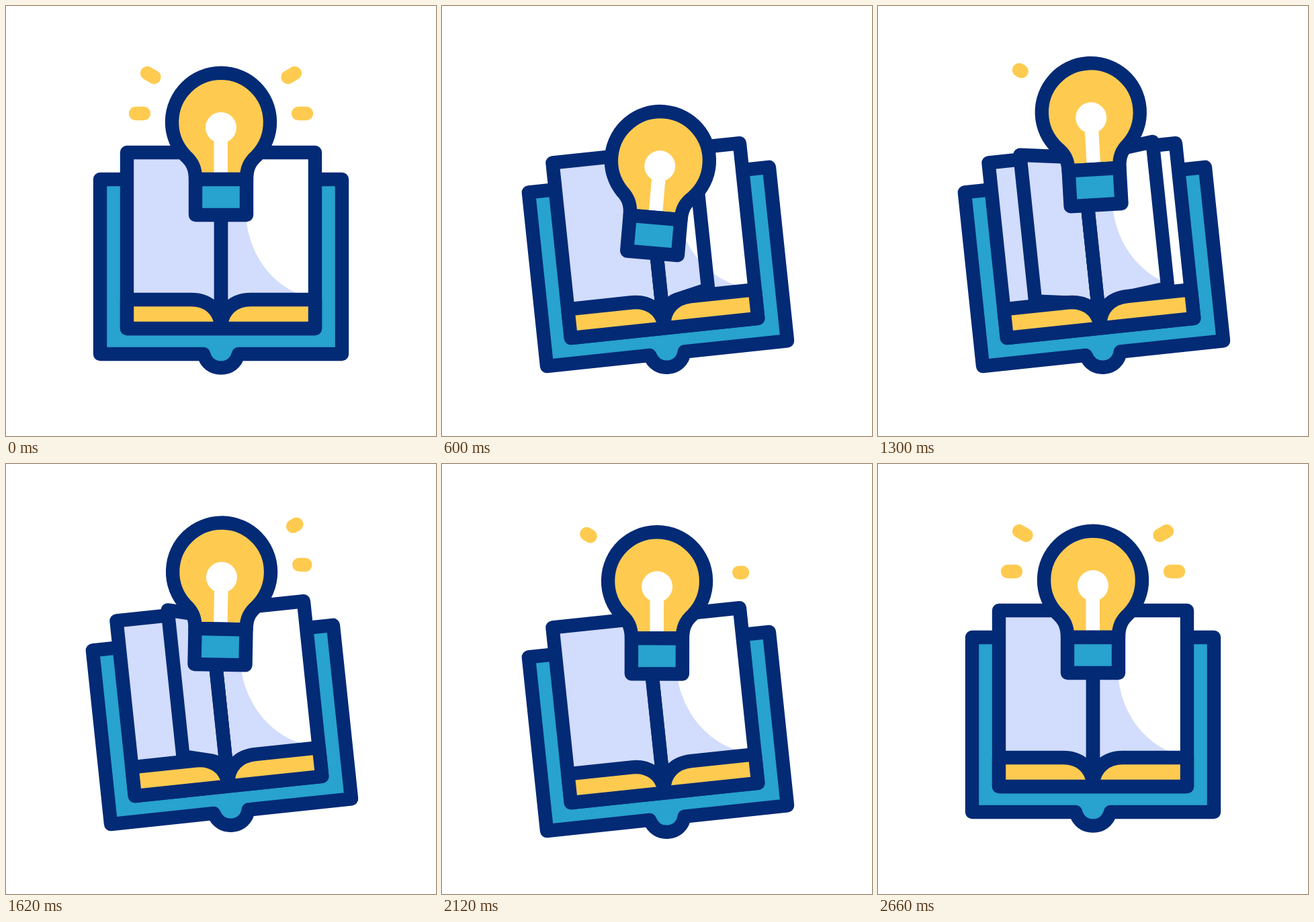
An HTML page with a canvas for the animation above (3.02 s loop, 640 by 640 pixels).

```html
<!DOCTYPE html>
<html lang="en">
<head>
<meta charset="utf-8">
<title>Book and bulb</title>
<style>
html, body { margin: 0; width: 100%; height: 100%; overflow: hidden; background: #fff; }
canvas { display: block; width: 640px; height: 640px; }
</style>
</head>
<body>
<canvas id="stage" width="640" height="640"></canvas>
<script>
const ctx = document.getElementById('stage').getContext('2d');
const LOOP = 3020;
const NAVY = '#032a75', TEAL = '#28a2ce', YELLOW = '#fecb50', LILAC = '#d2dcfd', WHITE = '#fff';

const cover = new Path2D('M140 258H500V518H346C342 532 332 538.5 320 538.5S298 532 294 518H140Z');
const block = new Path2D('M180 218H460V480H180Z');
const pageEdges = new Path2D('M180 437H276C300 437 318 452 320 475C322 452 340 437 364 437H460V480H180Z');
const spine = new Path2D('M320 218V476');
const shade = new Path2D('M160 190H380C365 245 357 270 357 305C357 355 385 407 434 428V480H160Z');
const glass = new Path2D('M282 258C282 241 277 232 267 223A73 73 0 1 1 373 223C363 232 358 241 358 258Z');
const socket = new Path2D('M282 258H358V311H282Z');

const clamp = v => Math.max(0, Math.min(1, v));
const ease = (t, from, to) => (1 - Math.cos(Math.PI * clamp((t - from) / (to - from)))) / 2;

// Each movement is a sum of eased steps
const bookY = t => 47 * (ease(t, 0, 240) - ease(t, 240, 484)) - 28.5 * ease(t, 1640, 1840)
  + 74.5 * ease(t, 1840, 2390) - 46 * ease(t, 2390, 2660);
const bookTurn = t => 6 * (ease(t, 2220, 2660) - ease(t, 0, 300));
const bulbY = t => 72 * ease(t, 0, 860) - 102 * ease(t, 860, 1450)
  + 56 * ease(t, 1450, 1900) - 26 * ease(t, 1900, 2160);
const bulbTurn = t => 15 * ease(t, 0, 380) - 23 * ease(t, 380, 860)
  + 9.5 * ease(t, 860, 1740) - 1.5 * ease(t, 1900, 2160);

function outlined(path, fill) {
  ctx.fillStyle = fill;
  ctx.fill(path);
  ctx.stroke(path);
}

function posed(pivotY, dy, degrees, draw) {
  ctx.save();
  ctx.translate(320, pivotY + dy);
  ctx.rotate(degrees * Math.PI / 180);
  ctx.translate(-320, -pivotY);
  draw();
  ctx.restore();
}

function shadedPage(path) {
  ctx.save();
  ctx.clip(path);
  ctx.fillStyle = WHITE;
  ctx.fill(path);
  ctx.fillStyle = LILAC;
  ctx.fill(shade);
  ctx.restore();
  ctx.stroke(path);
}

// A page swings about the spine; its outer edge tilts up, its inner edge down
function turningPage(progress) {
  const angle = progress * Math.PI, tilt = 9 * Math.sin(angle);
  const point = (x, y) => `${320 + 140 * x * Math.cos(angle)} ${y + tilt * (1 - 2 * x)} `;
  shadedPage(new Path2D('M' + point(0, 218) + 'L' + point(1, 218) + 'L' + point(1, 437) +
    'L' + point(0.31, 437) + 'C' + point(0.14, 437) + point(0.02, 452) + '320 475Z'));
}

function drawBook(t) {
  outlined(cover, TEAL);
  shadedPage(block);
  ctx.stroke(spine);
  for (let i = 0; i < 3; i++) {
    const u = (t - 366 - i * 388) / 825;
    if (u > 0 && u < 1) turningPage(1 - (1 - u) ** 1.2);
  }
  outlined(pageEdges, YELLOW);
  ctx.stroke(spine);
}

// Visible part of a ray: it grows outward, then leaves outward; the third growth stays
function raySpan(i, t) {
  if (t < 1200) return [clamp(t / 120), 1];
  const age = t - 1260 - 90 * i;
  const wave = Math.min(2, Math.floor(age / 400));
  const local = age - wave * 400;
  return age < 0 ? [0, 0] : [wave < 2 ? clamp(local / 120 - 1) : 0, clamp(local / 120)];
}

function drawRays(t) {
  ctx.strokeStyle = YELLOW;
  for (let i = 0; i < 4; i++) {
    const [from, to] = raySpan(i, t);
    if (to <= from) continue;
    const side = i < 2 ? -1 : 1, low = i % 2;
    const [x, y, angle] = low ? [115, 160, 0] : [99.5, 106, Math.PI / 6];
    ctx.beginPath();
    for (const u of [from, to]) {
      ctx.lineTo(320 + side * (x + 12 * u * Math.cos(angle)), y - 12 * u * Math.sin(angle));
    }
    ctx.stroke();
  }
  ctx.strokeStyle = NAVY;
}

function drawBulb(t) {
  drawRays(t);
  ctx.fillStyle = YELLOW;
  ctx.fill(glass);
  ctx.fillStyle = WHITE;
  ctx.beginPath();
  ctx.arc(320, 181, 23, 0, 2 * Math.PI);
  ctx.fill();
  ctx.fillRect(309.5, 190, 20.5, 66);
  ctx.stroke(glass);
  outlined(socket, TEAL);
}

function frame(now) {
  const t = now % LOOP;
  ctx.fillStyle = WHITE;
  ctx.fillRect(0, 0, 640, 640);
  ctx.lineWidth = 20.4;
  ctx.lineCap = ctx.lineJoin = 'round';
  ctx.strokeStyle = NAVY;
  posed(374, bookY(t), bookTurn(t), () => drawBook(t));
  posed(230, bulbY(t), bulbTurn(t), () => drawBulb(t));
}

const start = performance.now();
function tick() {
  frame(performance.now() - start);
  requestAnimationFrame(tick);
}
tick();
</script>
</body>
</html>
```
